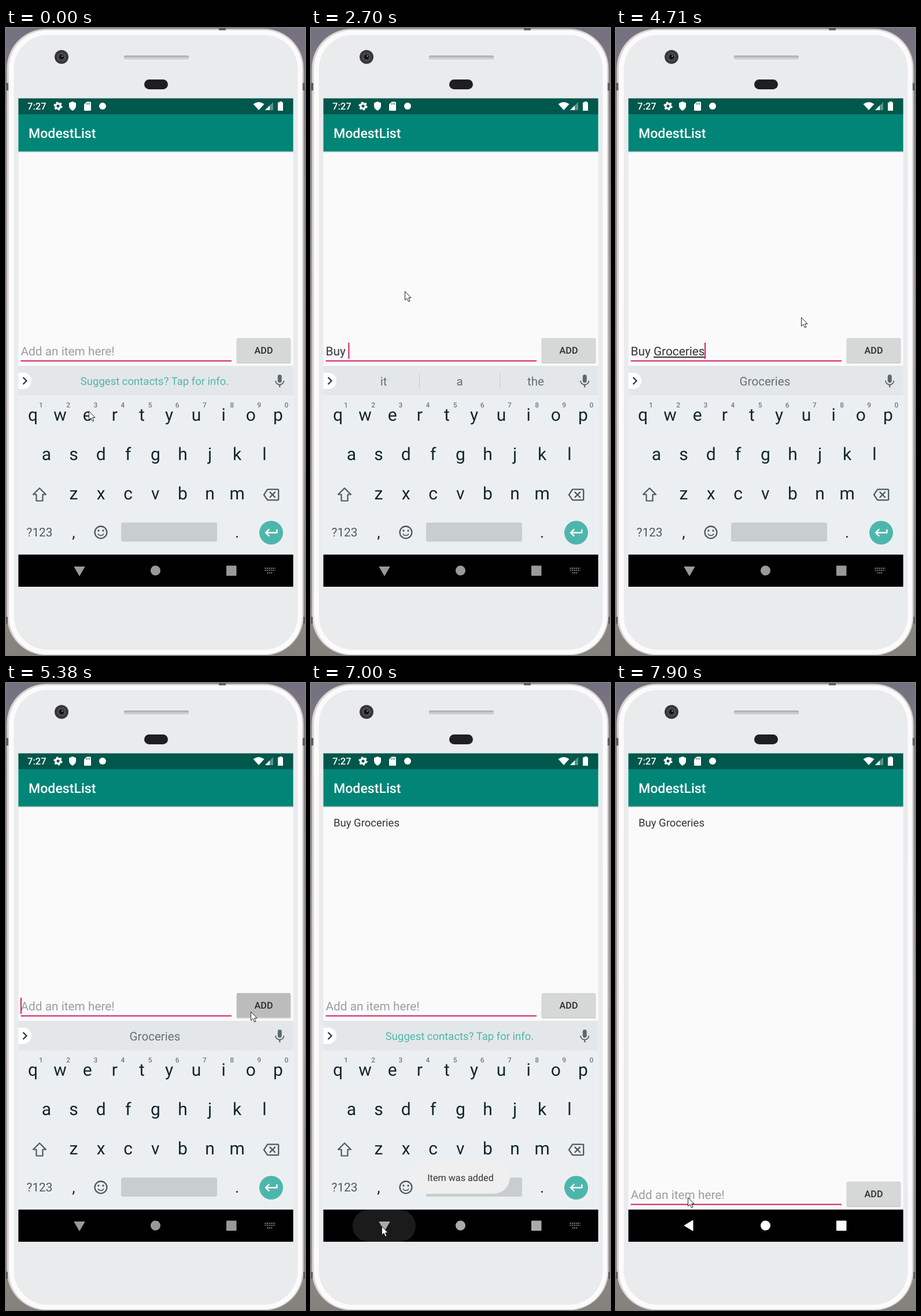
An HTML page that plays this animation: 517 by 1084 pixels, repeating every 8 s.

```html
<!DOCTYPE html>
<html lang="en">
<head>
<meta charset="utf-8">
<title>To-do list on a phone</title>
<style>
html, body { margin: 0; width: 100%; height: 100%; overflow: hidden; }
svg { display: block; width: 100vw; height: 100vh; font-family: Roboto, sans-serif; }
text { white-space: pre; text-rendering: geometricPrecision; }
.mid { text-anchor: middle; }
.bold { font-weight: 500; }
.line { fill: none; stroke: #4b5a62; stroke-width: 2.2; }
</style>
</head>
<body>
<svg viewBox="0 0 517 1084" preserveAspectRatio="none">
  <defs>
    <linearGradient id="room" x2="0" y2="1">
      <stop stop-color="#74707f"/><stop offset=".5" stop-color="#b5aeb0"/><stop offset="1" stop-color="#84827a"/>
    </linearGradient>
    <linearGradient id="grille" x2="0" y2="1">
      <stop stop-color="#929b9e"/><stop offset=".45" stop-color="#c3c9cb"/><stop offset="1" stop-color="#dfe3e4"/>
    </linearGradient>
    <linearGradient id="shade" x2="0" y2="1">
      <stop stop-opacity=".22"/><stop offset="1" stop-opacity="0"/>
    </linearGradient>
  </defs>

  <!-- phone body -->
  <rect width="517" height="1084" fill="url(#room)"/>
  <rect x="1" y="1" width="514" height="1084" rx="69" fill="#dcd5d5" stroke="#8a8385"/>
  <rect x="5" y="4" width="507" height="1079" rx="66" fill="#fbfbfb"/>
  <rect x="13.500" y="12" width="491" height="1063" rx="59" fill="#e9ebec"/>
  <path d="M368 0h12v4h-12zM0 95h4v13H0zM513 95h4v13h-4zM0 1018h3v12H0zM514 1018h3v12h-3z" fill="#625c60"/>
  <rect x="203" y="47" width="114" height="9" rx="3" fill="url(#grille)" stroke="#f8f8f8"/>
  <circle cx="96" cy="50" r="12" fill="#38383b"/>
  <circle cx="96" cy="50" r="7.500" fill="#4e4e52"/>
  <circle cx="96" cy="50" r="4.500" fill="#131316"/>
  <circle cx="97.500" cy="48.500" r="1.300" fill="#8b8b90"/>
  <rect x="239" y="89" width="41" height="17" rx="8.500" fill="#1f1f21"/>

  <!-- app -->
  <rect x="21.400" y="122" width="475.200" height="844" fill="#fafafa"/>
  <rect x="21.400" y="213" width="475.200" height="3" fill="url(#shade)"/>
  <rect x="21.400" y="149" width="475.200" height="64.400" fill="#008577"/>
  <rect x="21.400" y="121.600" width="475.200" height="27.400" fill="#00574b"/>
  <g fill="#fff">
    <text class="bold" x="37" y="141" font-size="16.500">7:27</text>
    <text class="bold" x="39" y="190" font-size="23.100">ModestList</text>
    <circle cx="90" cy="135" r="4.200" fill="none" stroke="#fff" stroke-width="3.400"/>
    <circle cx="90" cy="135" r="6.600" fill="none" stroke="#fff" stroke-width="2" stroke-dasharray="3.455"/>
    <path d="M115 127l6 2.500v5q0 5.500-6 8.500-6-3-6-8.500v-5z"/>
    <path d="M139.500 127.500h6q1.500 0 1.500 1.500v12.500q0 1.500-1.500 1.500h-9q-1.500 0-1.500-1.500V132z"/>
    <path d="M139.500 129.500v3M142 129.500v3M144.500 129.500v3" stroke="#00574b"/>
    <circle cx="167" cy="135" r="6"/>
    <path d="M427.500 131.500q9.500-7 19 0L437 142z"/>
    <path d="M462 128v14h-14z" opacity=".35"/>
    <path d="M456 134v8h-8z"/>
    <path d="M473 127h4v1.500h2V143h-9v-14.500h3z"/>
  </g>
  <text id="item" x="39" y="248" font-size="18.500" fill="#333">Buy Groceries</text>

  <g id="form">
    <text id="hint" x="25.500" y="566" font-size="20.800" fill="#9e9e9e">Add an item here!</text>
    <text x="25.500" y="566" font-size="20.800" fill="#333" xml:space="preserve" id="typed"><tspan id="done"></tspan><tspan id="word" text-decoration="underline"></tspan></text>
    <rect x="25.500" y="574.500" width="364.500" height="2" fill="#d81b60"/>
    <rect id="caret" y="544" width="2" height="28" fill="#d81b60"/>
    <rect x="398.500" y="537" width="94" height="43" rx="2" opacity=".18"/>
    <rect id="button" x="399" y="536" width="93" height="42" rx="2"/>
    <text class="mid bold" x="445.500" y="563" font-size="16.200" fill="#2b2b2b">ADD</text>
  </g>

  <g id="keyboard">
    <rect x="21.400" y="584" width="475.200" height="326" fill="#eceff1"/>
    <rect x="21.400" y="584" width="475.200" height="51" fill="#e4e7e9"/>
    <path d="M21.400 596H30a14 14 0 0 1 0 28h-8.600z" fill="#fff"/>
    <path class="line" d="M29.500 604l6 6-6 6" style="stroke:#26343b"/>
    <g id="strip" class="mid" font-size="20.600" fill="#657076"></g>
    <g id="keys" class="mid" fill="#10262f"></g>
    <path class="line" d="M58 795.500l11 11h-5.500v11h-11v-11H47z" stroke-linejoin="round"/>
    <rect x="199" y="855" width="166" height="33" rx="3" fill="#c8cdcf"/>
    <circle cx="458.500" cy="872.500" r="20.500" fill="#4db6ac"/>
    <!-- icons on a 24-unit grid -->
    <g fill="#4b5a62">
      <path transform="translate(459.400 597) scale(1.157)" fill="#5c686e" d="M12 14a3 3 0 0 0 3-3V5a3 3 0 0 0-6 0v6a3 3 0 0 0 3 3zM17.300 11c0 3-2.540 5.100-5.300 5.100S6.700 14 6.700 11H5c0 3.400 2.700 6.200 6 6.700V21h2v-3.300c3.300-.5 6-3.300 6-6.700z"/>
      <path transform="translate(444.600 793) scale(1.157)" fill-rule="evenodd" d="M22 3H7q-1 0-1.600.9L0 12l5.400 8.100Q6 21 7 21h15q2 0 2-2V5q0-2-2-2zM22 19H7.100L2.400 12l4.700-7H22zM10.400 17L14 13.400l3.600 3.600 1.400-1.400-3.600-3.600L19 8.400 17.600 7 14 10.600 10.400 7 9 8.400l3.600 3.600L9 15.600z"/>
      <g transform="translate(150.100 858) scale(1.157)">
        <circle cx="12" cy="12" r="9" fill="none" stroke="#4b5a62" stroke-width="2"/>
        <circle cx="8.500" cy="9.500" r="1.500"/>
        <circle cx="15.500" cy="9.500" r="1.500"/>
        <path d="M12 16c-1.500 0-2.750-.8-3.450-2H6.900a5.500 5.500 0 0 0 10.200 0h-1.650c-.7 1.200-1.950 2-3.450 2z"/>
      </g>
      <path transform="translate(445.200 858.600) scale(1.157)" fill="#fff" d="M19 7v4H5.830l3.580-3.590L8 6l-6 6 6 6 1.410-1.410L5.830 13H21V7z"/>
    </g>
  </g>

  <!-- navigation bar -->
  <rect x="21.400" y="910.400" width="475.200" height="55.600"/>
  <rect id="ripple" y="911" height="55" rx="27" fill="#1b1b1b"/>
  <g id="nav">
    <path id="back" stroke="currentColor" stroke-linejoin="round"/>
    <circle cx="258.500" cy="938" r="8.500"/>
    <rect x="381" y="929.500" width="17.500" height="17.500" rx="1"/>
    <path id="switcher" fill="none" stroke="#888" stroke-width="2" stroke-dasharray="2 1.400"
      d="M447.500 934h18M447.500 937.500h18M451.500 942h9"/>
  </g>

  <rect id="plate" x="173" y="826" width="171" height="57" rx="28" fill="#efefef"/>
  <text id="toast" class="mid" x="258.500" y="861" font-size="16.200" fill="#333">Item was added</text>
  <path id="pointer" d="M.5.500V15.500L4 12.300 6.500 18 9 17 6.600 11.500H11z" fill="#fff" stroke="#222" stroke-linejoin="round"/>
</svg>

<script>
const LOOP = 8000;
const $ = id => document.getElementById(id);
const set = (id, attrs) => {
  for (const k in attrs) $(id).setAttribute(k, attrs[k]);
};
const show = (id, on) => set(id, { opacity: +on });
const label = (x, y, s, extra = "") => `<text x="${x}" y="${y}" ${extra}>${s}</text>`;

// Latest entry of [time, ...values] rows
const at = (rows, t) => rows.findLast(r => r[0] <= t);
const within = (t, ...spans) => spans.some(([a, b]) => t >= a && t < b);

const pointer = [
  [0, 143, 662], [150, 153, 545], [270, 162, 455], [4560, 203, 455], [4710, 320, 500],
  [4830, 406, 543], [4980, 424, 552], [5260, 423, 568], [5650, 420, 567], [5800, 390, 550],
  [5920, 330, 520], [6040, 288, 523], [6190, 291, 526], [6340, 303, 619], [6490, 310, 745],
  [6610, 181, 898], [6760, 140, 930], [6880, 123, 939], [7000, 122, 939], [7270, 125, 943],
  [7510, 128, 925], [7630, 128, 897], [7780, 126, 893], [7900, 124, 889]
];

// time, finished text, word being typed
const typing = [
  [0, "", ""], [2310, "", "B"], [2430, "", "Bu"], [2580, "", "Buy"], [2700, "Buy ", ""],
  [3130, "Buy ", "G"], [3530, "Buy ", "Gr"], [3650, "Buy ", "Gro"], [3770, "Buy ", "Groc"],
  [3920, "Buy ", "Groce"], [4040, "Buy ", "Grocer"], [4160, "Buy ", "Groceri"],
  [4310, "Buy ", "Groceries"], [5380, "", ""]
];

// time, suggestions
const strips = [
  [0], [2700, "it", "a", "the"], [3130, "G", "Get", "Got"], [3530, "Gr", "Great", "Grab"],
  [3650, "Gro", "Groceries", "Grocery"], [3770, "Groc", "Groceries", "Grocery"],
  [3920, "Groce", "Groceries", "Grocery"], [4040, "Grocer", "Groceries", "Grocery"],
  [4160, "Groceri", "Groceries", ""], [4310, "Groceries"], [5800]
];

const ripple = [[0, 0], [6880, 42], [7000, 54.5], [7150, 58], [7270, 59.5], [7510, 0]];
const toastFade = [[0, 0], [5650, .5], [5800, 1], [7390, .8], [7510, .35], [7630, 0]];

function stripMarkup([, ...words]) {
  if (!words.length) return label(257, 617, "Suggest contacts? Tap for info.", 'font-size="18.5" fill="#4db6ac"');
  if (words.length === 1) return label(257.5, 618, words[0]);
  const bold = 'font-weight="700" fill="#000"';
  return words.map((w, i) => label(125.5 + 131.5 * i, 618, w, w === "Groceries" ? bold : "")).join("") +
    '<path d="M187.500 597v26M326.500 597v26" stroke="#c3c9cc"/>';
}

function buildKeys() {
  const row = (s, x, y) => [...s].map((c, i) => label(x + 47.1 * i, y, c, 'font-size="30"')).join("");
  const digits = [..."1234567890"]
    .map((c, i) => label(60.5 + 47.15 * i, 656, c, 'font-size="12" fill="#6d7a81" class="bold"')).join("");
  $("keys").innerHTML = row("qwertyuiop", 46.5, 679) + digits + row("asdfghjkl", 70, 747) +
    row("zxcvbnm", 117, 815) + label(58, 879, "?123", 'font-size="20.8" fill="#4b5a62"') +
    label(117, 881, ",", 'font-size="27"') + label(399.5, 881, ".", 'font-size="27"');
}

let lastStrip;
function draw(t) {
  const [, x, y] = at(pointer, t);
  set("pointer", { transform: `translate(${x} ${y})` });

  const [, done, word] = at(typing, t);
  $("done").textContent = done;
  $("word").textContent = word;
  const filled = done + word !== "";
  show("hint", !filled);
  set("caret", { x: 25 + (filled ? $("typed").getComputedTextLength() : 0) });
  show("caret", within(t, [150, 800], [1360, 1790], [2310, 4830], [5380, 5800], [6190, 6760], [7150, 7630]));

  const strip = at(strips, t);
  if (strip !== lastStrip) $("strip").innerHTML = stripMarkup(lastStrip = strip);

  const closed = t >= 7150;
  set("form", { transform: `translate(0 ${closed ? 326 : 0})` });
  set("button", { fill: within(t, [5260, 5530]) ? "#bbbcbb" : "#d6d7d7" });
  show("keyboard", !closed);
  show("switcher", !closed);
  show("item", t >= 5530);

  const half = at(ripple, t)[1];
  set("ripple", { x: 126.5 - half, width: 2 * half });
  const tone = closed ? "#fff" : t >= 6880 ? "#aaa" : "#999";
  set("nav", { fill: tone, color: tone });
  set("back", { d: closed ? "M118 938l15-9v18z" : "M118 931.500h18l-9 15.500z" });

  const fade = at(toastFade, t)[1];
  set("toast", { opacity: fade });
  set("plate", { opacity: t >= 6760 ? fade : 0 });
}

buildKeys();
const start = performance.now();
function tick() {
  draw((performance.now() - start) % LOOP);
  requestAnimationFrame(tick);
}
tick();
</script>
</body>
</html>
```
